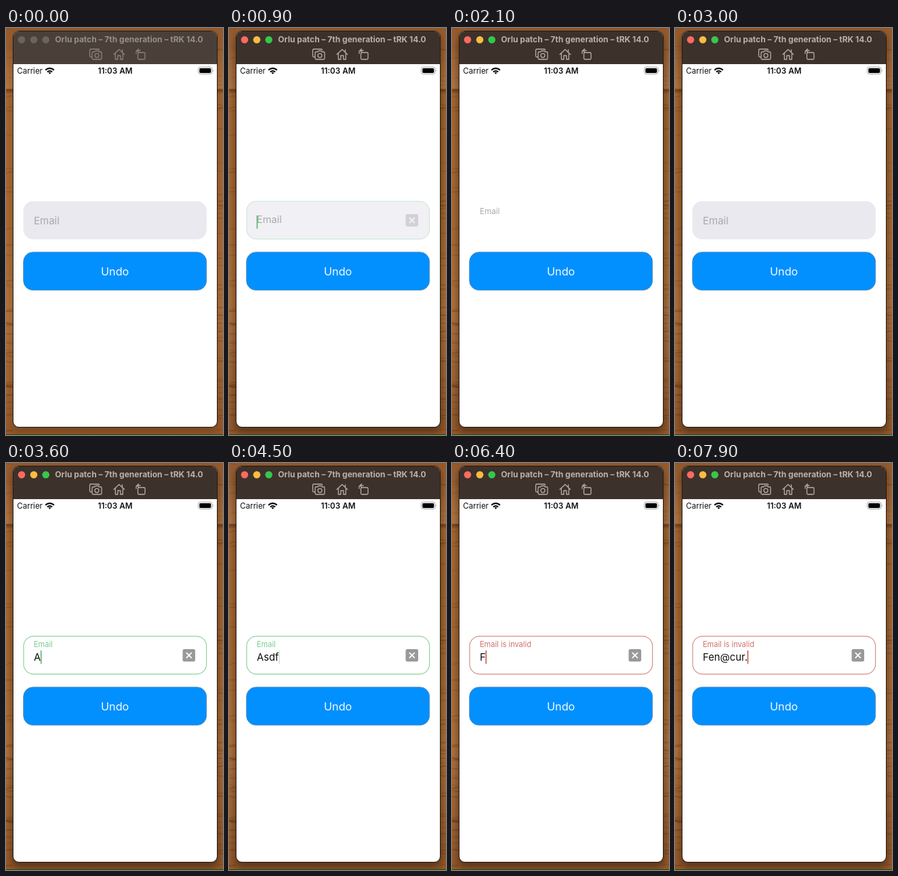
Write an HTML page that moves like this. It is 320 px wide and 597 px high and loops after 8 s.

```html
<!DOCTYPE html>
<html lang="en">
<head>
<meta charset="utf-8">
<title>Email field</title>
<style>
html, body { margin: 0; width: 100%; height: 100%; overflow: hidden; background: #935622; }
svg { display: block; width: 320px; height: 597px; }
text { font-family: Inter, Roboto, "Liberation Sans", sans-serif; white-space: pre; }
.icon { fill: none; stroke-width: 1.3; stroke-linejoin: round; stroke-linecap: round; }
</style>
</head>
<body>
<svg viewBox="0 0 320 597">
  <defs>
    <linearGradient id="wood" x2="0" y2="1">
      <stop offset="0" stop-color="#94592c"/>
      <stop offset=".148" stop-color="#b9783f"/>
      <stop offset=".152" stop-color="#74431c"/>
      <stop offset=".162" stop-color="#a9682f"/>
      <stop offset=".5" stop-color="#ad6b32"/>
      <stop offset=".7" stop-color="#b4733b"/>
      <stop offset="1" stop-color="#96592a"/>
    </linearGradient>
    <filter id="blur" x="-20%" y="-20%" width="140%" height="140%"><feGaussianBlur stdDeviation="6"/></filter>
    <clipPath id="win"><rect x="11" y="5" width="300" height="580" rx="8"/></clipPath>
  </defs>

  <rect width="320" height="597" fill="url(#wood)"/>
  <g id="grain" fill="none" stroke="#4a2408"/>
  <rect id="shadow" x="8" y="10" width="306" height="584" rx="10" filter="url(#blur)"/>
  <rect y="596" width="320" height="1" fill="#164f10"/>

  <rect x="10" y="4" width="302" height="582" rx="9" fill="#231c18"/>
  <g clip-path="url(#win)">
    <rect x="11" y="5" width="300" height="580" fill="#fff"/>
    <rect id="bar" x="11" y="5" width="300" height="48"/>
  </g>
  <circle class="light" cx="23" cy="17.3" r="5.3"/>
  <circle class="light" cx="41" cy="17.3" r="5.3"/>
  <circle class="light" cx="58.7" cy="17.3" r="5.3"/>
  <text id="title" x="181.5" y="21.2" font-size="12" font-weight="700" text-anchor="middle">Orlu patch – 7th generation – tRK 14.0</text>

  <g id="tools" class="icon">
    <path d="M126.500 42.500H125a1.500 1.500 0 0 1-1.500-1.500V32.500a1.500 1.500 0 0 1 1.500-1.500H136a1.500 1.500 0 0 1 1.500 1.500"/>
    <path d="M128.500 35H131l1-1.500h4l1 1.500h2.500a1.500 1.500 0 0 1 1.500 1.500V44.500a1.500 1.500 0 0 1-1.500 1.500H128.500a1.500 1.500 0 0 1-1.500-1.500V36.500a1.500 1.500 0 0 1 1.500-1.500z"/>
    <circle cx="134" cy="40.300" r="3"/>
    <path d="M159 38.800l7.800-7.300 7.800 7.300M161.300 37.200V46h3.500v-5.500h4V46h3.500V37.200M171.500 35.200v-3.200"/>
    <rect x="194.500" y="36" width="10.500" height="10" rx="1.500"/>
    <path d="M192 37.500v-2.500a2 2 0 0 1 2-2h4M195.500 30.700l-2.300 2.300 2.300 2.300"/>
  </g>

  <text x="16.300" y="67" font-size="11.500" fill="#111">Carrier</text>
  <g fill="none" stroke="#000" stroke-width="2.200">
    <path d="M58.200 61.700a9 9 0 0 1 12.600 0"/>
    <path d="M60.900 64.500a5.200 5.200 0 0 1 7.200 0"/>
    <path d="M62.700 65.700L64.500 67.700 66.300 65.700a2.600 2.600 0 0 0-3.600 0z" fill="#000" stroke="none"/>
  </g>
  <text x="161" y="67" font-size="11.700" font-weight="600" text-anchor="middle" fill="#111">11:03 AM</text>
  <rect x="283.500" y="57.300" width="20.500" height="10.200" rx="3" fill="#fff" stroke="#9b9b9b" stroke-width=".9"/>
  <rect x="285.200" y="59" width="17.100" height="6.900" rx="1.600"/>
  <path d="M305 60.700q1.800 1.800 0 3.600z" fill="#9b9b9b"/>

  <rect id="fill" x="25.500" y="254" width="270.500" height="56" rx="14.500" fill="#eae9ef"/>
  <rect id="edge" x="26" y="254.200" width="269.600" height="55.400" rx="14.500" fill="none" stroke-width="1.200"/>
  <text id="label" font-size="15"></text>
  <text id="typed" x="41" y="290.300" font-size="14.800" fill="#111"></text>
  <rect id="caret" y="275" width="1.600" height="19.500"/>
  <g id="clear">
    <rect x="260.500" y="273" width="18.500" height="18.300" rx="2.500" fill="#999"/>
    <path d="M265.800 278.200l8 8m0-8l-8 8" stroke="#fff" stroke-width="1.700"/>
  </g>

  <rect x="25.700" y="328.800" width="270" height="55.800" rx="14" fill="#0290ff" stroke="#5585b5" stroke-width=".8"/>
  <text x="160.700" y="363" font-size="16.200" text-anchor="middle" fill="#f4faff">Undo</text>
</svg>
<script>
const LOOP = 8000, ACTIVE = 250, ERROR = 5000;
const FOCUS = [[850, 2040], [3100, 5000], [5650, LOOP]];
const CLEAR = 5950;
const KEYS = [
  [3480, 'A'], [3660, 's'], [3830, 'd'], [3980, 'f'],
  [6330, 'F'], [6560, 'e'], [6780, 'n'], [7060, '@'],
  [7300, 'c'], [7480, 'u'], [7660, 'r'], [7840, '.']
];
const GREY = [170, 168, 174];
const GREEN = { line: '#8fd3a0', text: [121, 203, 145], caret: '#55b875' };
const RED = { line: '#d98e88', text: [207, 112, 106], caret: '#c4594f' };

const $ = id => document.getElementById(id);
const set = (el, attrs) => { for (const k in attrs) el.setAttribute(k, attrs[k]); };
const clamp = v => Math.max(0, Math.min(1, v));
const ramp = (t, from, span) => clamp((t - from) / span);
const ease = v => v * v * (3 - 2 * v);
const mix = (a, b, p) => `rgb(${a.map((v, i) => Math.round(v + (b[i] - v) * p))})`;
const lights = document.querySelectorAll('.light');

function drawGrain() {
  let seed = 7;
  const rand = () => (seed = seed * 16807 % 2147483647) / 2147483647;
  for (let i = 0; i < 110; i++) {
    const x = i % 2 ? 311 : 0, y = rand() * 594, slope = rand() * 4 - 2;
    const line = document.createElementNS('http://www.w3.org/2000/svg', 'path');
    set(line, {
      d: `M${x} ${y}q5 ${slope} 10 ${slope}`,
      'stroke-width': .6 + rand() * 2,
      opacity: .05 + rand() * .22
    });
    $('grain').append(line);
  }
}

function drawWindow(on) {
  const colors = on ? ['#fc6b60', '#f8bd42', '#34c84c'] : ['#6b635d', '#6b635d', '#6b635d'];
  lights.forEach((el, i) => set(el, { fill: colors[i] }));
  set($('bar'), { fill: on ? '#3d312b' : '#4a4039' });
  set($('title'), { fill: on ? '#b9b1ac' : '#968e89' });
  set($('tools'), { stroke: on ? '#b5ada8' : '#8a827d' });
  set($('shadow'), { opacity: on ? .4 : .2 });
}

// 1 = label raised, 0 = placeholder
function labelRise(t) {
  if (t >= FOCUS[1][0]) return ease(ramp(t, FOCUS[1][0], 250));
  if (t >= FOCUS[0][1]) return 1 - ease(ramp(t, FOCUS[0][1], 240));
  return ease(ramp(t, FOCUS[0][0], 250));
}

function fillAlpha(t) {
  if (t >= FOCUS[1][0]) return 1 - ramp(t, FOCUS[1][0], 150);
  if (t >= FOCUS[0][1]) return ramp(t, FOCUS[0][1] + 90, 220);
  return 1 - ramp(t, FOCUS[0][0], 150);
}

function blink(age) {
  const p = age % 1000;
  return p < 550 ? 1 - ramp(p, 450, 100) : ramp(p, 900, 100);
}

function render(t) {
  const focus = FOCUS.find(([a, b]) => t >= a && t < b);
  const error = t >= ERROR;
  const theme = error ? RED : GREEN;
  const rise = labelRise(t);
  const keys = KEYS.filter(([at]) => at <= t && (t < CLEAR || at > CLEAR));

  drawWindow(t >= ACTIVE);
  set($('fill'), { opacity: fillAlpha(t) });
  set($('edge'), {
    stroke: theme.line,
    opacity: error ? 1 : focus ? ramp(t, focus[0], 150) : 0
  });

  $('label').textContent = error ? 'Email is invalid' : 'Email';
  set($('label'), {
    transform: `translate(41 ${287.5 - 17.2 * rise}) scale(${1 - .265 * rise})`,
    fill: mix(GREY, theme.text, focus || error ? rise : 0)
  });

  $('typed').textContent = keys.map(k => k[1]).join('');
  const width = keys.length ? $('typed').getComputedTextLength() : 0;
  const last = Math.max(focus ? focus[0] : 0, keys.length ? keys[keys.length - 1][0] : 0);
  set($('caret'), {
    x: 40.7 + width,
    fill: theme.caret,
    opacity: focus ? blink(t - last) : 0
  });
  set($('clear'), { opacity: focus ? ramp(t, focus[0], 150) : 0 });
}

drawGrain();
const start = performance.now();
function tick() {
  render((performance.now() - start) % LOOP);
  requestAnimationFrame(tick);
}
tick();
</script>
</body>
</html>
```
